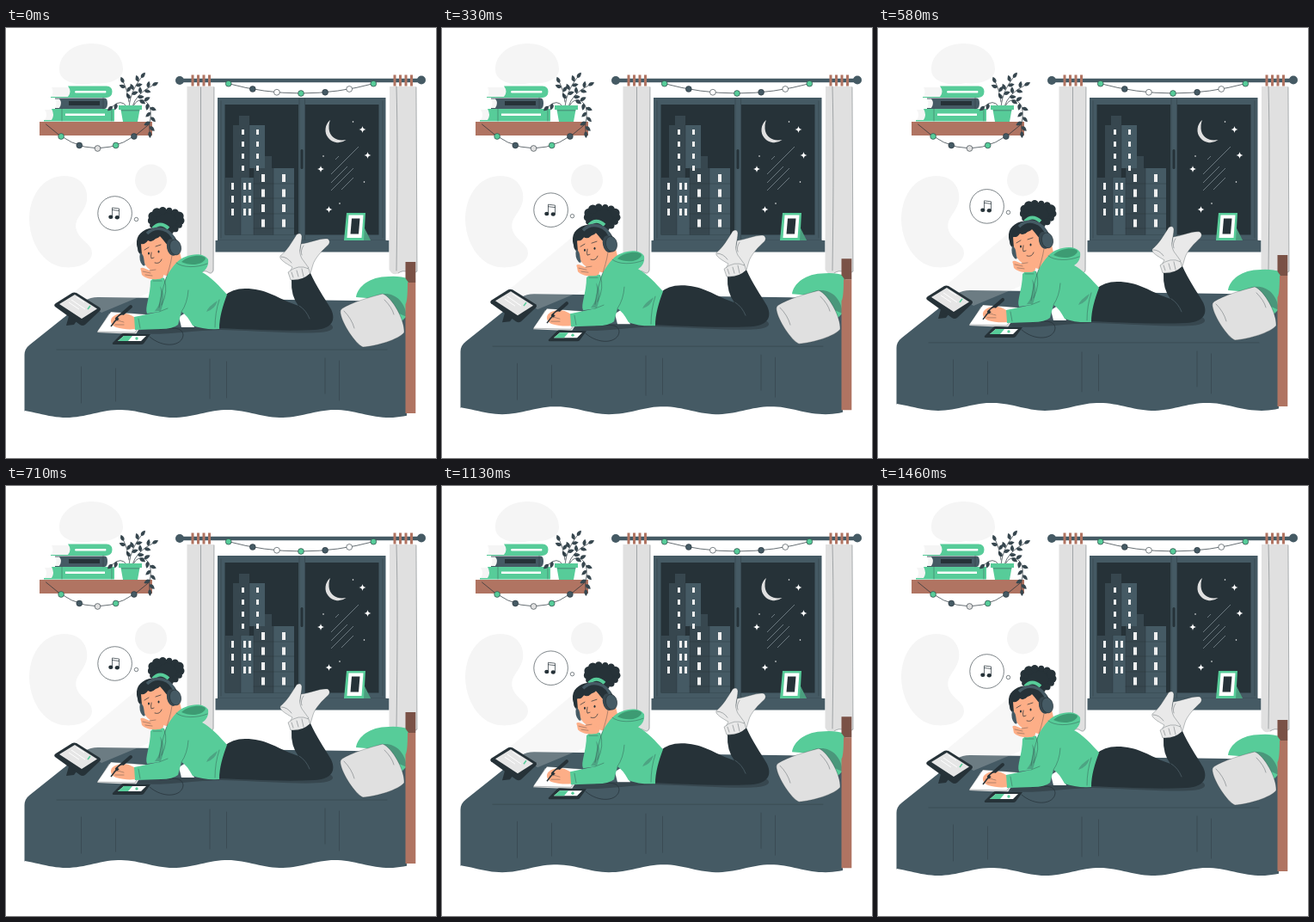
An HTML page that plays this animation: 500 by 500 pixels, repeating every 1500 ms.

```html
<!DOCTYPE html>
<html lang="en">
<head>
<meta charset="utf-8">
<title>Night study</title>
<style>
html, body { margin: 0; width: 100%; height: 100%; overflow: hidden; background: #fff }
svg { display: block; width: 100vw; height: 100vh }
.green { fill: #57cc99 } .dark { fill: #263238 } .slate { fill: #455a64 } .shade { fill: #37474f }
.brown { fill: #b07462 } .cloth { fill: #e0e0e0 } .pale { fill: #f5f5f5 } .white { fill: #fff }
.skin { fill: #fdae87 } .sock { fill: #e9e9e9 }
.line { fill: none; stroke: #263238; stroke-width: .7; stroke-linecap: round; stroke-linejoin: round }
.edge { stroke: #263238; stroke-width: .6; stroke-linejoin: round }
.soft { stroke-opacity: .5 }
.lit { fill: none; stroke: #f0f0f0 }
</style>
</head>
<body>
<svg viewBox="0 0 500 500">
  <defs><path id="star" d="M0-4Q.4-.4 4 0Q.4 .4 0 4Q-.4 .4-4 0Q-.4-.4 0-4Z"/></defs>
  <g class="pale">
    <path d="M62 48C62 32 77 18 99 18S136 31 136 48C136 60 120 66 102 64C86 68 62 64 62 48Z"/>
    <path d="M27 221C28 193 44 172 68 172C88 172 96 187 94 201C91 216 78 221 82 235C87 249 100 250 100 262C99 274 83 280 66 278C43 275 27 249 27 221Z"/>
    <circle cx="168.500" cy="177" r="18.500"/>
  </g>

  <!-- shelf -->
  <path class="brown" d="M39 109H170V125H39Z"/>
  <path class="pale" d="M45 95H58V107H45Q49 101 45 95ZM57 82H66V93H57Q60 87 57 82ZM53 69H75V80H53Q56 74 53 69Z"/>
  <path class="green" d="M53 94H126V108.500H44V107H53Q57 101 53 94ZM72 67.500H117Q123.500 68 123.500 74T117 81H52V80H72Q77 74 72 67.500Z"/>
  <path class="slate" d="M57 81.500H115Q118 82 118 87.500T115 94H57V93H62Q66 87 62 82.500H57Z"/>
  <path class="white" d="M69 99.500H115V102H69ZM81 73H116Q117 74.300 116 75.500H81Q79 74.300 81 73Z"/>
  <path class="dark" d="M73 85H109V90H73Z"/>
  <path class="line soft" d="M123 94V108M65 94V108M113 81V94"/>
  <g id="plant" class="shade">
    <path class="line" d="M143 91Q145 73 157 58"/>
    <path class="line" d="M143 86Q141 72 137 64"/>
    <path class="line" d="M147 91Q152 76 170 67"/>
    <path class="line" d="M148 91C154 78 167 84 168 96S166 108 167 120"/>
    <path class="line" d="M140 91Q134 82 124 91"/>
  </g>
  <path class="green" d="M131 90H158V95H155.500L153 109H136L133.500 95H131Z"/>
  <path class="shade" opacity=".35" d="M133.500 95H155.500V96.500H134Z"/>
  <g id="shelfGarland"></g>

  <!-- window -->
  <path class="slate" d="M246 81H441.500V248H246Z"/>
  <path class="dark" d="M254.500 89H340V240.500H254.500ZM348 89H433.500V240.500H348Z"/>
  <path class="line soft" d="M250 85V244M438 85V244M341 82V246M347.500 82V246M246 247H442"/>
  <path class="slate" d="M243.500 247H445.500V260.500H243.500Z"/>
  <rect class="dark" x="342.500" y="141" width="3" height="23" rx="1.500"/>
  <path class="shade" d="M271 102H283V113H271ZM264 113H283V174H264ZM255 174H273V240.500H255ZM292 149H309V163H292ZM288 163H311V240.500H288Z"/>
  <path class="slate" d="M283 113H301V163H283ZM273 174H288V240.500H273ZM311 163H335V240.500H311Z"/>
  <path class="line soft" d="M283 113V174M273 174V240M288 163V240M311 163V240M288 181H335M288 198H335M288 216H335M288 233H335"/>
  <path class="lit" stroke-width="3" stroke-dasharray="6 8" d="M275.500 118V168M292.500 118V168"/>
  <path class="lit" stroke-width="3" stroke-dasharray="8 7" d="M263.500 180V220M277.500 180V220M283.500 180V220"/>
  <path class="lit" stroke-width="4" stroke-dasharray="9 8.500" d="M299 170V233M323 170V233"/>
  <path class="cloth" d="M377 107A14.500 14.500 0 1 0 395.500 130C385 132 378 127 376 120Q374.500 113 377 107Z"/>
  <path d="M383 153L387 149M378 170L410 138M378 180L397 161M378 189L404 163M390 188L404 174" stroke="#8c999f" stroke-width=".7"/>
  <g class="white">
    <use href="#star" x="414.500" y="118"/><use href="#star" x="366" y="164"/>
    <use href="#star" x="375.500" y="211"/><use href="#star" x="420.500" y="148"/>
    <path d="M403.500 109h0M369 149h0M388 204h0M416.500 179h0" stroke="#fff" stroke-width="1.600" stroke-linecap="round"/>
  </g>
  <path class="green" d="M396 215H418L417 233L424 247H393Z"/>
  <path class="shade" opacity=".35" d="M418 215L416 247H418L424 247L417 233Z"/>
  <path class="white" d="M398.500 217.500H415.500L413.500 244H396.500Z"/>
  <path class="dark" d="M402 221.500H411.500L410 239.500H400.500Z"/>

  <!-- curtains -->
  <path class="cloth" d="M210.500 68H242L241.500 282Q239 287 235 284T226 285Q219 287 210.500 283ZM446 68H477L478 283Q472 287 467 284T456 285T445.500 281Z"/>
  <path class="line soft" d="M226.500 69V282M242 69L241 282Q239 287 235 284T226 285M454 68Q456 140 454 282M477 69L478 283Q472 287 467 284T456 285"/>
  <path d="M202 61H483" stroke="#455a64" stroke-width="4.500"/>
  <circle class="slate" cx="202" cy="61" r="5"/><circle class="slate" cx="483" cy="60.500" r="5"/>
  <path d="M214 61H238M449 61H474" stroke="#b07462" stroke-width="13" stroke-dasharray="3 3.500" stroke-dashoffset="-1.500"/>
  <g id="windowGarland"></g>

  <g id="bob">
    <!-- thought bubble -->
    <circle class="white edge" cx="126.600" cy="215.500" r="19.800"/>
    <circle class="white edge" cx="151.500" cy="222.500" r="2.200"/>
    <path class="line" stroke-width="1" d="M123.500 219.500V209L131.500 210V220M123.500 211.500L131.500 212.500"/>
    <ellipse class="dark" cx="121.800" cy="219.800" rx="2.600" ry="2.200"/>
    <ellipse class="dark" cx="129.300" cy="220.300" rx="2.600" ry="2.200"/>

    <!-- bed -->
    <path id="bed" class="slate"/>
    <path class="line soft" d="M59 374H443M87.500 394V436M127.500 396V434M237 385V431M256.500 388V430M371 384V425M387.500 387V433"/>
    <path class="green" d="M407 313C409 301 422 289 445 289Q458 288 469 292V332L458 343L432 315Z"/>
    <path class="shade" opacity=".4" d="M430 311C448 304 464 315 466 336L457 332L440 312Z"/>
    <path class="brown" d="M467 296H476.300V448H464.500V321Q467 318 467 296Z"/>
    <path fill="#7a5146" d="M464.500 272H476.300V296H468L464.500 291Z"/>
    <path class="cloth edge soft" d="M391 326C402 319 423 313 438 309C449 313 464 340 463 354C457 362 431 370 415 371C406 367 391 344 389 332Q388 328 391 326Z"/>
    <path class="line soft" d="M393 329Q402 338 405 349M440 316Q449 325 451 333"/>
    <path class="shade" d="M147 353C190 344 240 350 300 348C345 341 382 339 380 349C374 359 320 353 250 351C210 352 168 360 147 353Z"/>
    <path fill="#e0e0e0" opacity=".25" d="M78 308L161 239L190 255V298L111 331Z"/>

    <!-- tablet, notebook, phone -->
    <path class="dark" d="M73 335L85 337L79 345L70 346Z"/>
    <path class="dark" d="M77 308Q79 307 82 308L109 325Q111 327 109 329L92 345Q89 347 86 345L57 324Q55 322 58 320Z"/>
    <path fill="#e6e6e6" d="M80 310L106 326.500L88 338L62 321Z"/>
    <path d="M76 316L92 327M73 319L85 327M82 313L91 319" stroke="#fff"/>
    <path d="M95 327L98 323" stroke="#57cc99" stroke-width="1.500"/>
    <path class="cloth" d="M106 354L151 356L161 340V337L120 332Z"/>
    <path class="white edge soft" d="M106 353L122 330L163 333L150 354Z"/>
    <path class="line" d="M167 359C183 373 205 370 206 357C205 347 193 349 179 350"/>
    <path class="dark" d="M124 366L134 356Q135 355 137 355L168 356L160 367Q159 368 157 368H126Q123 368 124 366Z"/>
    <path class="white" d="M130 364L137 358H163L157 364Z"/>
    <path class="green" d="M130 364L137 358H147L142 364Z"/>
    <circle class="green" cx="152" cy="361" r="1.700"/>

    <!-- legs -->
    <g class="sock edge soft">
      <path d="M343 251C353 250 365 244 374 245Q378 248 375 252C368 258 359 268 357 275L354 285L344 288L340 270Z"/>
      <path d="M338 240Q343 237 344 242C344 252 339 259 344 268L352 279L333 291L329 285L333 278C326 274 317 269 319 265C326 260 333 248 338 240Z"/>
      <path d="M328 284Q340 274 352 280L355 291L331 293Z"/>
    </g>
    <path class="line soft" d="M332 284L334 290M338 282L340 289M344 280L346 289M320 266Q327 266 332 273M346 253Q342 259 344 264"/>
    <path class="dark" d="M332 293Q344 294 354 285C360 299 371 315 378 327C385 342 376 350 359 351C320 353 278 350 246 349C243 333 246 321 253 312Q263 303 278 303C302 303 314 313 332 320L340 323Q331 311 332 293Z"/>
    <path class="line" style="stroke:#54666f" d="M341 323Q349 328 353 338"/>

    <!-- hoodie -->
    <path class="white" d="M201 336L209 331L219 348H204Z"/>
    <path class="skin" d="M181 260L201 256L205 273L191 289L178 286Z"/>
    <path class="green" d="M168 294Q175 287 184 291L188 310L185 329L164 332C161 325 168 312 168 294Z"/>
    <path class="green" d="M198 273C207 263 229 259 235 269C236 276 233 281 228 284C237 288 250 302 257 310C252 323 248 337 248 350Q230 351 217 346Q210 333 204 330L200 345Q194 350 180 350L150 351Q147 342 149 336L178 330C177 313 182 290 198 273Z"/>
    <path fill="#3d9b73" d="M204 272C213 263 231 263 232 268C229 276 214 277 204 272Z"/>
    <path class="line soft" d="M198 273C205 279 222 279 234 274M204 330Q211 320 212 305M178 330L188 326M184 292Q189 306 181 322M248 316Q243 331 243 348M154 338L156 349M171 294L181 294"/>
    <path class="shade" opacity=".3" d="M246 317Q235 324 233 330Q243 327 246 317ZM179 300Q187 310 180 329L173 329Q183 317 179 300Z"/>

    <!-- writing hand -->
    <path class="skin" d="M149 336C141 331 132 330 124 336C120 340 122 346 128 348C135 350 143 351 150 350Z"/>
    <path class="line soft" d="M125 341Q131 339 137 342M127 345L137 345"/>
    <path d="M122 347L129 338" stroke="#263238" stroke-width="1.500"/>
    <path d="M129 338L145 324" stroke="#263238" stroke-width="4" stroke-linecap="round"/>
    <path class="skin" d="M130 337Q134 331 139 335L135 341Z"/>

    <!-- head -->
    <g id="curls" class="dark"></g>
    <path class="dark" d="M152 248C153 235 170 229 184 234C198 239 204 253 198 264L188 264L158 263Q151 256 152 248Z"/>
    <path class="skin" d="M156 253C159 247 171 246 178 241C184 247 187 254 194 256Q198 262 191 268C189 278 184 283 177 284C168 284 160 276 158 267Z"/>
    <path class="skin" d="M157 282Q155 278 160 279L167 282C171 275 176 277 175 281L183 286Q184 292 176 292C167 293 161 290 158 287Z"/>
    <path class="line soft" d="M159 283L168 285M162 287L170 288M167 282L174 281"/>
    <path class="line" d="M169 261Q168 266 169 268L172 267M173 273Q179 275 181 269M161 258L166 255M174 254L180 252"/>
    <ellipse class="dark" cx="166" cy="262" rx="1" ry="1.500"/>
    <ellipse class="dark" cx="177.500" cy="260" rx="1" ry="1.500"/>
    <path class="dark" d="M153 256C151 241 166 232 181 236Q181 243 174 245Q169 250 165 247Q162 252 157 251L158 264Q153 262 153 256Z"/>
    <path d="M171 233Q179 224 189 233" fill="none" stroke="#57cc99" stroke-width="4"/>
    <path d="M164 239C175 228 192 234 196 248" fill="none" stroke="#455a64" stroke-width="3.500"/>
    <path class="slate" d="M156 261Q160 262 161 273Q163 278 159 276Q154 271 156 261Z"/>
    <ellipse class="shade" cx="193" cy="255" rx="6" ry="10" transform="rotate(-12 193 255)"/>
    <ellipse class="slate edge" cx="197" cy="255" rx="6.500" ry="9" transform="rotate(-12 197 255)"/>
    <path class="line soft" d="M193 265C190 285 181 300 178 325"/>
  </g>
</svg>
<script>
const $ = id => document.getElementById(id);
const range = n => Array.from({ length: n }, (_, i) => i);

// A parabolic cord with evenly spaced beads, centred on its lowest point.
function garland(id, { x, y, half, sag, count, gap, kinds }) {
  const bead = i => {
    const dx = (i - (count - 1) / 2) * gap;
    const cy = y - sag * (dx / half) ** 2;
    return `<circle class="${kinds[i % kinds.length]} edge" cx="${x + dx}" cy="${cy}" r="3.400"/>`;
  };
  $(id).innerHTML = `<path class="line" d="M${x - half} ${y - sag}Q${x} ${y + sag} ${x + half} ${y - sag}"/>`
    + range(count).map(bead).join('');
}
garland('shelfGarland', { x: 106.5, y: 140, half: 60, sag: 28, count: 5, gap: 21.2, kinds: ['green', 'slate', 'cloth'] });
garland('windowGarland', { x: 343, y: 76, half: 85, sag: 11.5, count: 7, gap: 28.1, kinds: ['green', 'slate', 'white'] });

// Leaves alternate along each stem and end in one at the tip.
for (const stem of document.querySelectorAll('#plant path')) {
  const length = stem.getTotalLength();
  let side = 1;
  for (let d = length; d > 8; d -= 5.5) {
    const p = stem.getPointAtLength(d), q = stem.getPointAtLength(d - 1);
    const tilt = Math.atan2(p.y - q.y, p.x - q.x) * 180 / Math.PI + (d < length ? side * 50 : 0);
    stem.insertAdjacentHTML('afterend',
      `<path transform="translate(${p.x} ${p.y}) rotate(${tilt})" d="M0 0Q3 -4.500 8 0Q3 4 0 0Z"/>`);
    side = -side;
  }
}

$('curls').innerHTML = '<ellipse cx="186" cy="224" rx="18" ry="13"/>' + range(14).map(i => {
  const a = i * Math.PI / 7;
  return `<circle cx="${186 + 17 * Math.cos(a)}" cy="${224 + 12 * Math.sin(a)}" r="${4.5 + Math.sin(i * 5)}"/>`;
}).join('');

const hem = range(112).map(i => {
  const x = 466 - i * 4;
  return `L${x} ${(448.5 + 4.5 * Math.cos(2 * Math.PI * (x - 70) / 125)).toFixed(1)}`;
}).join('');
$('bed').setAttribute('d', `M21.500 380Q21.500 373 28 368L92 317Q98 313 107 313L405 317L466 321${hem}L21.500 446Z`);

const LOOP = 1500, SWING = 1460, RISE = 9;
const start = performance.now();
function frame() {
  const t = Math.min((performance.now() - start) % LOOP, SWING);
  const y = -RISE * (1 - Math.cos(2 * Math.PI * t / SWING)) / 2;
  $('bob').setAttribute('transform', `translate(0 ${y.toFixed(2)})`);
  requestAnimationFrame(frame);
}
frame();
</script>
</body>
</html>
```
